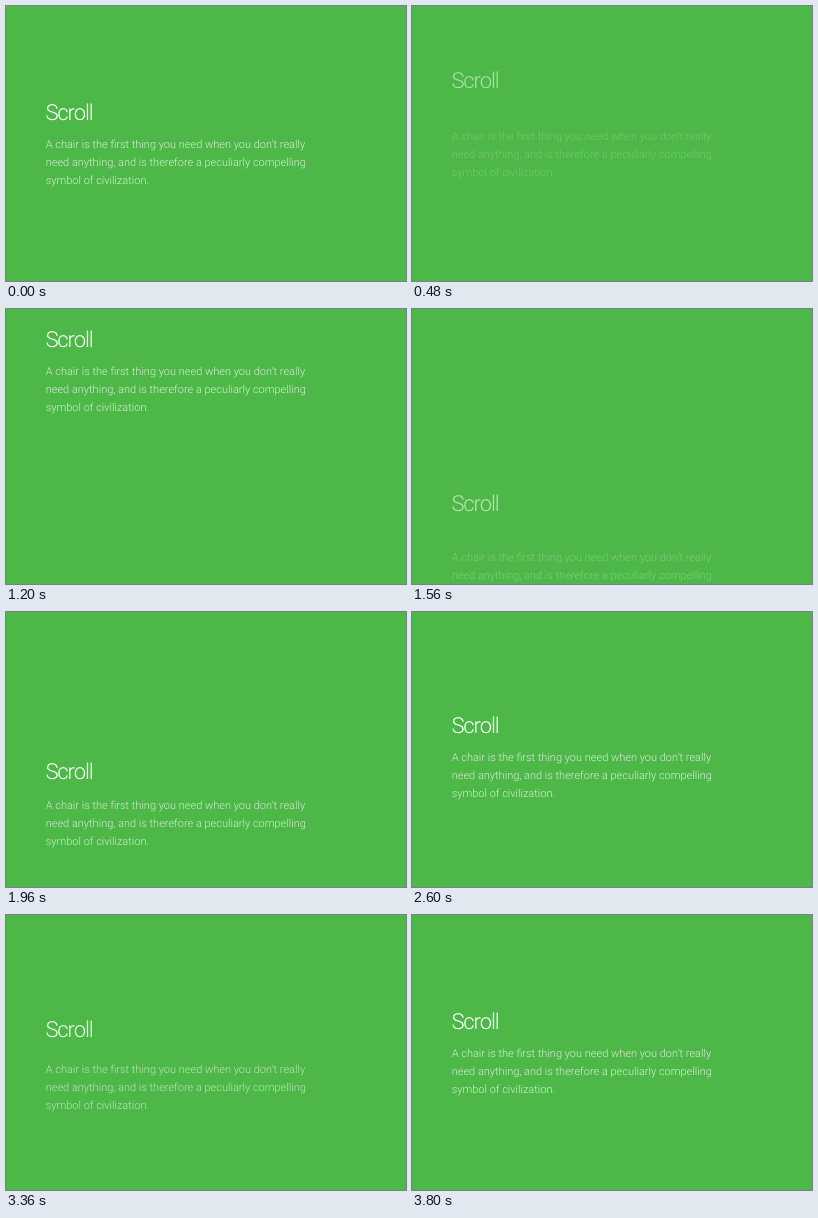
An HTML page for the animation above (3840 ms loop, 400 by 275 pixels).

```html
<!DOCTYPE html>
<html lang="en">
<head>
<meta charset="utf-8">
<title>Scroll</title>
<style>
  html, body { margin: 0; width: 100%; height: 100%; overflow: hidden; background: #4db848; }
  svg { display: block; width: 400px; height: 275px; }
  text { fill: #fff; font-family: Roboto, sans-serif; font-weight: 300; text-rendering: geometricPrecision; }
  #title { font-size: 22px; letter-spacing: -1.1px; }
  #body { font-size: 11px; fill-opacity: .77; }
</style>
</head>
<body>
<svg viewBox="0 0 400 275">
  <text id="title" x="39.4">Scroll</text>
  <text id="body">
    <tspan x="39.7">A chair is the first thing you need when you don’t really</tspan>
    <tspan x="39.7" dy="18">need anything, and is therefore a peculiarly compelling</tspan>
    <tspan x="39.7" dy="18">symbol of civilization.</tspan>
  </text>
</svg>
<script>
const LOOP = 3840, ENTER_TIME = 880, RISE = 100, BODY_DELAY = 86, BODY_GAP = 28;
const title = document.getElementById('title');
const body = document.getElementById('body');

// Each pass: when the text enters, starts to leave and is gone; resting title baseline.
const passes = [
  { enter: 2955 - LOOP, leave: 20, gone: 270, rest: 114 },
  { enter: 305, leave: 1170, gone: 1350, rest: 41 },
  { enter: 1362, leave: 2320, gone: 2955, rest: 166 }
];

const clamp = v => Math.min(1, Math.max(0, v));

function place(el, t, pass, delay, gap) {
  const left = (1 - clamp((t - pass.enter - delay) / ENTER_TIME)) ** 4;
  const exit = clamp((t - pass.leave) / (pass.gone - pass.leave)) ** 2;
  const y = pass.rest + gap + RISE * left - (pass.rest + 65) * exit;
  el.setAttribute('transform', `translate(0 ${y.toFixed(2)})`);
  el.setAttribute('opacity', ((1 - left) ** 1.2).toFixed(3));
}

function draw(now) {
  let t = now % LOOP;
  if (t >= passes[0].enter + LOOP) t -= LOOP;
  const pass = passes.filter(p => p.enter <= t).pop();
  place(title, t, pass, 0, 0);
  place(body, t, pass, BODY_DELAY, BODY_GAP);
}

function tick() {
  draw(performance.now());
  requestAnimationFrame(tick);
}
tick();
</script>
</body>
</html>
```
